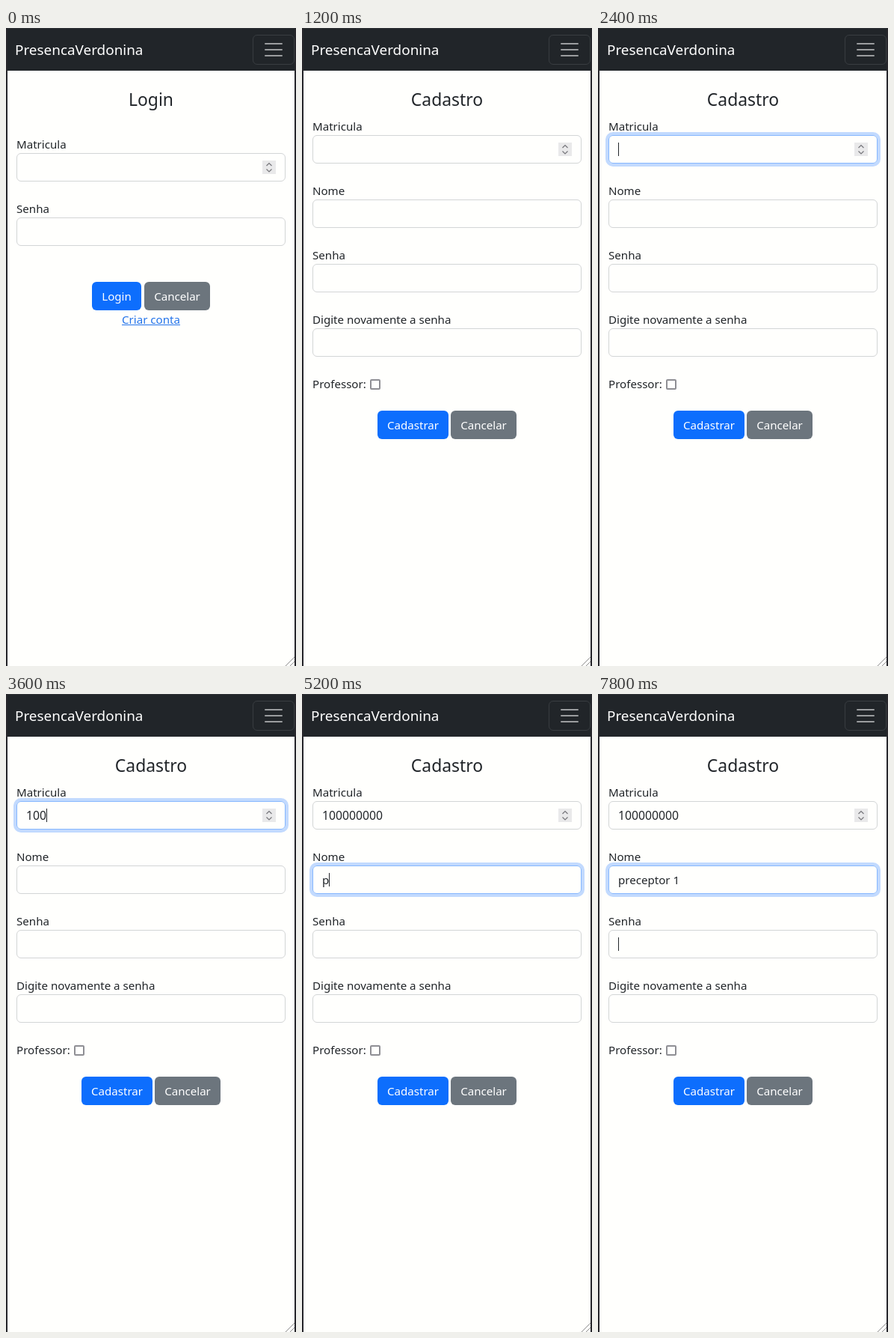
Write an HTML page that moves like this. It is 388 px wide and 852 px high and loops after 8 s.

```html
<!DOCTYPE html>
<html lang="pt-BR">
<head>
<meta charset="utf-8">
<title>Cadastro</title>
<style>
  html, body { margin: 0; width: 100%; height: 100%; overflow: hidden; }
  body { background: #27272c; color: #212529; font: 15.1px/24px "Noto Sans", "Open Sans", sans-serif; }
  #stage { position: relative; width: 388px; height: 852px; overflow: hidden; }
  #stage div, #stage svg { position: absolute; box-sizing: border-box; white-space: pre; }
  .page { left: 2px; top: 0; width: 384px; height: 852px; background: #fffffd; }
  .nav { left: 2px; top: 0; width: 384px; height: 57px; background: #212529; border-top: 1px solid #303236; }
  .brand { left: 12px; top: 14px; color: #fff; font-size: 18.9px; line-height: 30px; }
  .toggler { left: 330px; top: 9px; width: 56px; height: 40px; border: 1px solid #393d41; border-radius: 6px; }
  .icons { left: 0; top: 0; }
  .screen { left: 0; top: 0; width: 388px; height: 852px; }
  .title { left: 0; top: 81.5px; width: 388px; text-align: center; font-size: 22.9px; font-weight: 500; line-height: 28.8px; }
  .label { left: 14px; }
  #stage .field { left: 14px; width: 360px; height: 38px; padding-left: 12px; border: 1px solid #d3d5d6;
    border-radius: 6px; display: flex; align-items: center; }
  #stage .field.focus { border-color: #86b7fe; box-shadow: 0 0 0 4px rgba(13, 110, 253, .25); }
  .number { font-size: 15.75px; }
  .caret { width: 1px; height: 18px; background: #212529; visibility: hidden; }
  .caret.on { visibility: visible; }
  .spin { right: 12px; top: 9px; }
  .btn { height: 38px; line-height: 38px; border-radius: 6px; color: #fff; text-align: center; background: #6c757d; }
  .blue { background: #0d6efd; }
  .link { left: 0; top: 377px; width: 388px; text-align: center; color: #2474ea; text-decoration: underline; }
  .check { left: 91px; top: 469px; width: 14px; height: 14px; border: 2px solid #8f8f94; border-radius: 2px; }
</style>
</head>
<body>
<div id="stage">
  <div class="page"></div>
  <div class="nav"></div>
  <div class="brand">PresencaVerdonina</div>
  <div class="toggler"></div>
  <svg class="icons" width="388" height="852" fill="none">
    <path d="M347 21h22M347 29h22M347 37h22" stroke="#9b9d9f" stroke-width="2" stroke-linecap="round"/>
    <path d="M374 852l12-12M380 852l6-6" stroke="#8c8c8c"/>
  </svg>
  <div class="screen" id="login"><div class="title">Login</div></div>
  <div class="screen" id="signup"><div class="title">Cadastro</div></div>
</div>
<script>
const LOOP = 8000, SWITCH = 1200;
const login = document.getElementById('login');
const signup = document.getElementById('signup');

function add(parent, cls, text = '', style = {}) {
  const el = document.createElement('div');
  el.className = cls;
  el.textContent = text;
  Object.assign(el.style, style);
  parent.append(el);
  return el;
}

// Label with its input box; y is the top of the box.
function addField(screen, label, y, isNumber) {
  add(screen, 'label', label, { top: y - 24 + 'px' });
  const box = add(screen, 'field', '', { top: y + 'px' });
  const text = document.createElement('span');
  const caret = document.createElement('span');
  caret.className = 'caret';
  box.append(text, caret);
  if (isNumber) {
    text.className = 'number';
    box.insertAdjacentHTML('beforeend',
      `<svg class="spin" width="18" height="18" fill="none">
        <path d="M0 0h18v18H0z" fill="#e9e9ea"/>
        <path d="M5.5 7L9 3.5 12.5 7M5.5 11.500L9 15l3.500-3.500" stroke="#77777b" stroke-width="1.200"/>
      </svg>`);
  }
  return { box, text, caret };
}

function addButton(screen, label, x, y, width, blue) {
  add(screen, blue ? 'btn blue' : 'btn', label, { left: x + 'px', top: y + 'px', width: width + 'px' });
}

addField(login, 'Matricula', 167, true);
addField(login, 'Senha', 253);
addButton(login, 'Login', 115, 339, 66, true);
addButton(login, 'Cancelar', 185, 339, 88);
add(login, 'link', 'Criar conta');

const fields = [
  addField(signup, 'Matricula', 143, true),
  addField(signup, 'Nome', 229),
  addField(signup, 'Senha', 315),
  addField(signup, 'Digite novamente a senha', 401)
];
add(signup, 'label', 'Professor:', { top: '463px' });
add(signup, 'check');
addButton(signup, 'Cadastrar', 101, 511, 95, true);
addButton(signup, 'Cancelar', 199, 511, 88);

// Each key press: [time, characters typed so far].
const typing = [
  { value: '100000000', keys: [[2800, 1], [3000, 2], [3600, 3], [3800, 4], [4000, 6], [4200, 7], [4400, 8], [4600, 9]] },
  { value: 'preceptor 1', keys: [[5200, 1], [5800, 2], [6000, 4], [6200, 5], [6400, 6], [6600, 7], [6800, 8], [7000, 9], [7400, 10], [7600, 11]] }
];
const caretAt = [[1800, 0], [4800, 1], [6200, -1], [6400, 1], [7800, 2]];
const ringAt = [[2000, 0], [5000, 1]];

// Value of the last step reached at time t.
function at(steps, t, before) {
  return steps.reduce((value, [time, next]) => t >= time ? next : value, before);
}

function draw() {
  const t = performance.now() % LOOP;
  login.style.display = t < SWITCH ? 'block' : 'none';
  signup.style.display = t < SWITCH ? 'none' : 'block';
  const caret = at(caretAt, t, -1), ring = at(ringAt, t, -1);
  fields.forEach((field, i) => {
    field.box.classList.toggle('focus', i === ring);
    field.caret.classList.toggle('on', i === caret);
    if (typing[i]) field.text.textContent = typing[i].value.slice(0, at(typing[i].keys, t, 0));
  });
  requestAnimationFrame(draw);
}
draw();
</script>
</body>
</html>
```
